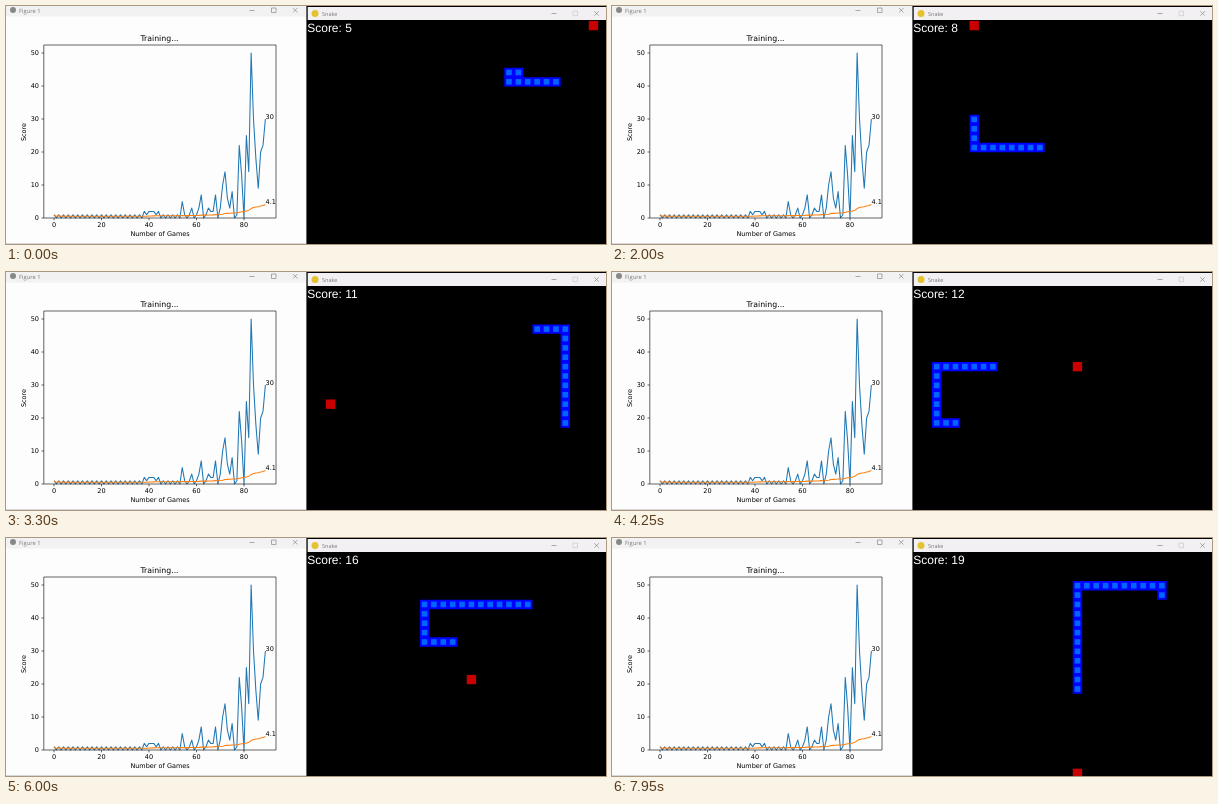
An HTML page with a canvas that plays this animation: 600x238 px, repeating every 8 s.

```html
<!DOCTYPE html>
<html lang="en">
<head>
<meta charset="utf-8">
<title>Snake training</title>
<style>
  html, body { margin: 0; width: 100%; height: 100%; overflow: hidden; background: #fdfdfd; }
  svg, canvas { position: absolute; left: 0; top: 0; width: 600px; height: 238px; }
  text { text-rendering: geometricPrecision; }
  .plot text { font: 6.5px "DejaVu Sans", sans-serif; fill: #000; }
  .plot .title { font-size: 7.8px; }
  .bar text { font: 5.8px "Open Sans", sans-serif; fill: #777; }
  .bar path { fill: none; stroke: #888; stroke-width: .7; }
  .bar .faded { stroke: #c8c8c8; }
  .series { fill: none; stroke-width: 1.05; stroke-linejoin: round; }
  .axes { fill: none; stroke: #222; stroke-width: .7; }
</style>
</head>
<body>
<svg viewBox="0 0 600 238">
  <g class="bar">
    <rect width="300" height="10.5" fill="#f3f2f3"/>
    <circle cx="7" cy="4" r="3" fill="#888"/>
    <text x="13" y="6.6">Figure 1</text>
    <path d="M243.5 4.5h5M265.5 2h4.500v4.500h-4.500zM287 2l4.500 4.500m0-4.500l-4.500 4.500"/>
    <path class="faded" d="M0 237.500h300"/>
    <rect x="300.4" width="300" height="238"/>
    <rect x="301.7" y="1" width="299" height="13" fill="#f3f0f4"/>
    <circle cx="309" cy="7.500" r="3.500" fill="#e3c331"/>
    <text x="316" y="9.6" style="font-size:5.5px">Snake</text>
    <path class="faded" d="M567 5.200h4.500v4.500h-4.500z"/>
    <path d="M545.5 7.500h5M588.3 5.200l4.500 4.500m0-4.500l-4.500 4.500"/>
  </g>
  <g class="plot" id="plot">
    <text class="title" x="153.500" y="34.800" text-anchor="middle">Training...</text>
    <text x="154" y="230.3" text-anchor="middle">Number of Games</text>
    <text transform="translate(20.3 126) rotate(-90)" text-anchor="middle">Score</text>
  </g>
</svg>
<canvas id="game"></canvas>
<script>
const plot = document.getElementById('plot');
const plotX = n => 48 + n * 2.375;
const plotY = v => 212 - v * 3.3;

// Early games alternate between 0 and 1 with a hump near game 41; then the scores take off.
const TAKE_OFF = 54;
const lateScores = [
  5, 1, 0, 1, 3, 0, 1, 3, 7, 0, 1, 3, 2, 2, 7, 0, 3, 10,
  14, 6, 3, 8, 0, 1, 22, 13, 0, 25, 14, 50, 30, 18, 9, 20, 22, 30
];
const earlyScore = n => (n + 1) % 2 + Math.round(1.6 * Math.exp(-(((n - 41) / 3) ** 2)));
const scores = [...Array.from({ length: TAKE_OFF }, (_, n) => earlyScore(n)), ...lateScores];

function add(tag, attrs, text = '') {
  const node = document.createElementNS(plot.namespaceURI, tag);
  for (const key in attrs) node.setAttribute(key, attrs[key]);
  node.textContent = text;
  plot.append(node);
}

function drawPlot() {
  const points = values => values.map((v, n) => `${plotX(n)},${plotY(v)}`).join(' ');
  let sum = 0;
  const means = scores.map((v, n) => (sum += v) / (n + 1));
  for (const [values, stroke] of [[scores, '#1f77b4'], [means, '#ff7f0e']]) {
    const last = values[values.length - 1];
    add('polyline', { class: 'series', stroke, points: points(values) });
    add('text', { x: 259.6, y: plotY(last) }, Math.round(last * 10) / 10);
  }

  let ticks = 'M37.8 39H270V212H37.8Z';
  for (let v = 0; v <= 50; v += 10) {
    ticks += `M37.8 ${plotY(v)}h-2.3`;
    add('text', { x: 33, y: plotY(v) + 2.4, 'text-anchor': 'end' }, v);
  }
  for (let n = 0; n <= 80; n += 20) {
    ticks += `M${plotX(n)} 212v2.3`;
    add('text', { x: plotX(n), y: 221.4, 'text-anchor': 'middle' }, n);
  }
  add('path', { class: 'axes', d: ticks });
}

// Cells the snake heads for: always sideways first, then up or down.
const tail = [26, 6], start = [21, 5];
const DETOUR = true;
const stops = [
  [30, 0], [22, 16], [31, 13], [6, 0], [3, 4, DETOUR], [26, 4], [27, 14], [2, 12], [2, 8, DETOUR],
  [17, 8], [29, 18], [28, 5], [12, 9], [17, 13], [3, 15], [26, 3], [17, 23]
];
const LOOP = 8000, TICK = 50, STEPS_PER_MS = .03901, FIRST_SCORE = 5;
const CELL = 9.385, LEFT = 301.2, TOP = 14.85;

const route = [tail];
function travelTo([toX, toY]) {
  let [x, y] = route[route.length - 1];
  while (x !== toX) route.push([x += Math.sign(toX - x), y]);
  while (y !== toY) route.push([x, y += Math.sign(toY - y)]);
  return route.length - 1;
}
const startIndex = travelTo(start) + 1;
const foods = [];
for (const stop of stops) {
  const index = travelTo(stop);
  if (!stop[2]) foods.push({ cell: stop, index });
}

const canvas = document.getElementById('game');
const ctx = canvas.getContext('2d');
const ratio = window.devicePixelRatio || 1;
canvas.width = 600 * ratio;
canvas.height = 238 * ratio;
ctx.scale(ratio, ratio);

function square([x, y], color, inset = 0) {
  ctx.fillStyle = color;
  ctx.fillRect(LEFT + x * CELL + inset, TOP + y * CELL + inset, CELL - 2 * inset, CELL - 2 * inset);
}

function drawGame(ms) {
  const head = startIndex + Math.max(0, Math.floor(ms * STEPS_PER_MS - .1));
  const eaten = foods.filter(food => food.index <= head).length;
  const score = FIRST_SCORE + eaten;
  const body = route.slice(head - score - 2, head + 1);

  ctx.clearRect(0, 0, 600, 238);
  // One thick line keeps the body free of seams between cells.
  ctx.beginPath();
  for (const [x, y] of body) ctx.lineTo(LEFT + (x + .5) * CELL, TOP + (y + .5) * CELL);
  ctx.lineWidth = CELL;
  ctx.lineCap = 'square';
  ctx.strokeStyle = '#00f';
  ctx.stroke();
  for (const cell of body) square(cell, '#0064ff', CELL / 5);

  if (foods[eaten]) square(foods[eaten].cell, '#c80000');
  ctx.fillStyle = '#fff';
  ctx.font = '12px "Liberation Sans", sans-serif';
  ctx.textRendering = 'geometricPrecision';
  ctx.fillText('Score: ' + score, LEFT, 25.8);
}

function frame(now) {
  drawGame(Math.floor((now + 1) % LOOP / TICK) * TICK);
  requestAnimationFrame(frame);
}

drawPlot();
drawGame(0);
requestAnimationFrame(frame);
</script>
</body>
</html>
```
